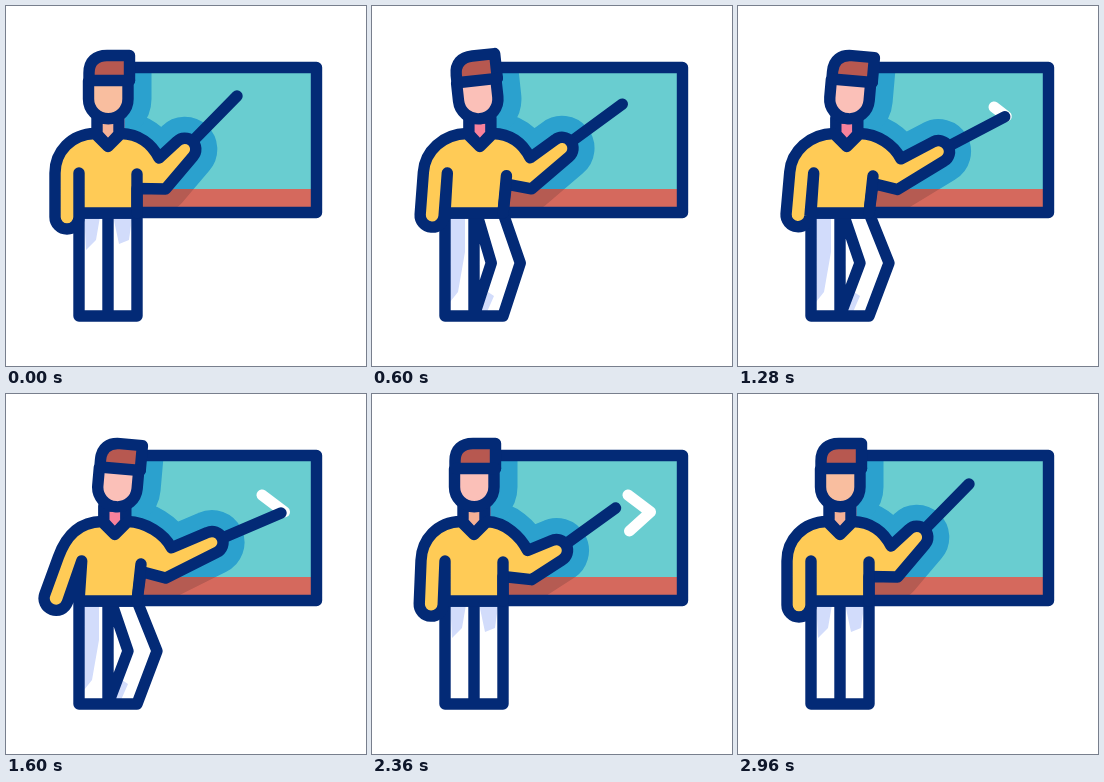
These frames come from a looping animation (360 by 360 pixels, 3 s). An HTML page:

```html
<!DOCTYPE html>
<html lang="en">
<head>
<meta charset="utf-8">
<title>Teacher at the board</title>
<style>
  html, body { margin: 0; width: 100%; height: 100%; overflow: hidden; background: #fff; }
  svg { display: block; width: 100vw; height: 100vh; }
  .ink { stroke: #032a76; stroke-width: 11.4; }
  .halo { stroke-width: 43; }
</style>
</head>
<body>
<svg viewBox="0 0 360 360" fill="none" stroke-linejoin="round" stroke-linecap="round">
  <defs>
    <clipPath id="teal"><path d="M119 61H311V183H119Z"/></clipPath>
    <clipPath id="rail"><path d="M119 183H311V207H119Z"/></clipPath>
    <clipPath id="pants"><path id="pantsClip"/></clipPath>
    <path id="skull" d="M83 74V67C83 55 90 49.500 101 49.500H123.500V74L122 76V93A19.750 19.750 0 0 1 82.500 93V75Z"/>
    <g id="shape">
      <path id="torsoHalo"/>
      <path id="headHalo" d="M83 60H124V93A20 20 0 0 1 83 93Z"/>
    </g>
  </defs>

  <path d="M119 61H311V183H119Z" fill="#69cdd0"/>
  <path d="M119 183H311V207H119Z" fill="#d5695d"/>
  <g clip-path="url(#teal)"><use href="#shape" class="halo" fill="#2ba1ce" stroke="#2ba1ce"/></g>
  <g clip-path="url(#rail)"><use href="#shape" class="halo" fill="#b55b52" stroke="#b55b52"/></g>
  <path class="ink" d="M123 61.500H310.500V206.500H131"/>

  <path id="chalk" d="M256 101L278.500 118L257.500 137" stroke="#fff" stroke-width="11" pathLength="1"/>
  <path id="stick" class="ink"/>

  <path id="legFill" fill="#fff"/>
  <g clip-path="url(#pants)"><path id="tint" fill="#d2dcfb"/></g>
  <path id="legs" class="ink"/>

  <path id="neck" class="ink" d="M91 112V128L102 140L113 128V112Z"/>
  <path id="torso" class="ink" fill="#ffcb56"/>
  <path id="side" class="ink"/>

  <g id="head">
    <use id="face" href="#skull"/>
    <path d="M83 74V67C83 55 90 49.500 101 49.500H123.500V74Z" fill="#b75850"/>
    <use href="#skull" class="ink"/>
    <path class="ink" d="M83 74.500H123.500"/>
  </g>
</svg>
<script>
const LOOP = 3000, STEP = 40, HOLD = 200;
const PEACH = "#f9be9f", PINK = "#fbc0b8";

// Pointing arm: where the hand and the stick's tip are at each turn
const rest = { hand: [179, 143], tip: [231, 90] };
const begin = { hand: [194, 142], tip: [257, 101] };
const corner = { hand: [206, 148.5], tip: [275, 119] };
const end = { hand: [190, 170], tip: [256, 138] };

const shades = {
  waist: "M78 205H95L90 234L80 244ZM106 205H127L123 234L113 238Z",
  lean: "M78 205H93V246L86 286L78 296ZM108 306L116 286L122 290L115 306Z",
  full: "M70 205H160V312H70Z"
};

const $ = id => document.getElementById(id);
const set = (id, name, value) => $(id).setAttribute(name, value);
const pt = (x, y) => x.toFixed(2) + " " + y.toFixed(2);
const mix = (a, b, u) => a.map((v, i) => v + (b[i] - v) * u);

// Progress from 0 to 1 between two times
const linear = (t, a, b) => Math.min(1, Math.max(0, (t - a) / (b - a)));
const ease = (t, a, b) => {
  const u = linear(t, a, b);
  return u * u * (3 - 2 * u);
};

function armAt(t, part) {
  let p = mix(rest[part], begin[part], ease(t, 200, 800));
  p = mix(p, corner[part], ease(t, 920, 1600));
  p = mix(p, end[part], linear(t, 1600, 2040));
  return mix(p, rest[part], ease(t, 2040, 2680));
}

function torsoPath(lean, swing, [handX, handY]) {
  const c = 6.8 * lean, d = 2.7 * lean;
  // hanging arm
  const sx = 61 + d, sy = 167;
  const wristX = 61 - lean - 17 * swing, wristY = 211 - 2 * lean - 8 * swing;
  const len = Math.hypot(wristX - sx, wristY - sy);
  const ux = (wristX - sx) / len, uy = (wristY - sy) / len;
  const nx = uy * 12, ny = -ux * 12;
  // the elbow follows the pointing hand
  const elbowX = 153 + .46 * (handX - 179), elbowY = 152 + .33 * (handY - 143);
  const underX = 159.5, underY = 183 + .2 * (handY - 143);
  const a = Math.atan2(handY - (elbowY + underY) / 2, handX - (elbowX + underX) / 2);
  const hx = Math.sin(a) * 11, hy = -Math.cos(a) * 11;
  return "M" + pt(73 + d, 167) +
    "L" + pt(wristX + nx, wristY + ny) +
    "A12 12 0 0 1 " + pt(wristX - nx, wristY - ny) +
    "L" + pt(sx - nx, sy - ny) +
    "C" + pt(sx - nx - ux * 21, sy - ny - uy * 21) + " " + pt(65 + c, 128) + " " + pt(89 + c, 127.5) +
    "L" + pt(102 + c, 140.5) + "L" + pt(115 + c, 127.5) +
    "C" + pt(133 + c, 128) + " " + pt(elbowX - 7, elbowY - 14) + " " + pt(elbowX, elbowY) +
    "L" + pt(handX + hx, handY + hy) +
    "A11 11 0 0 1 " + pt(handX - hx, handY - hy) +
    "L" + pt(underX, underY) +
    "L" + pt(131 + 4 * lean, 182.5 - 5 * lean) + "L131 207L73 207Z";
}

function draw(ms) {
  const t = ms < HOLD ? 0 : Math.floor(ms / STEP) * STEP;
  const lean = ease(t, 200, 720) - ease(t, 1640, 2040);
  const swing = ease(t, 1300, 1840) - ease(t, 1880, 2480);
  const nod = Math.sin(Math.PI * linear(t, 240, 960)) ** 2;
  const hand = armAt(t, "hand"), tip = armAt(t, "tip");

  const body = torsoPath(lean, swing, hand);
  set("torso", "d", body);
  set("torsoHalo", "d", body);
  set("side", "d", "M" + pt(131 + 4 * lean, 168 + 2 * lean) + "L131 207");
  set("stick", "d", "M" + pt(...hand) + "L" + pt(...tip));

  const pose = `translate(${7.3 * lean} 0) rotate(${5 * lean - 10.5 * nod} 102 115)`;
  set("head", "transform", pose);
  set("headHalo", "transform", pose);
  set("neck", "transform", `translate(${6.8 * lean} 0)`);

  const knee = 20 * lean;
  const legs = "M73 207H102V310H73ZM" + pt(102 + knee * .15, 207) + "L" + pt(102 + knee, 257) +
    "L102 310H131L" + pt(131 + knee, 257) + "L131 207Z";
  for (const id of ["legFill", "legs", "pantsClip"]) set(id, "d", legs);

  const drawn = (ease(t, 920, 1600) + linear(t, 1600, 2040)) / 2;
  set("chalk", "stroke-dasharray", drawn.toFixed(4) + " 3");
  set("chalk", "opacity", drawn > .005 ? 1 - linear(t, 2560, 2880) : 0);

  set("face", "fill", t < 400 || t > 2660 ? PEACH : PINK);
  set("neck", "fill", lean > .5 ? "#f8829c" : "#f5b196");
  set("tint", "d", t > 1740 && t < 2120 ? shades.full : lean > .5 ? shades.lean : shades.waist);
}

const start = performance.now();
function tick() {
  draw((performance.now() - start) % LOOP);
  requestAnimationFrame(tick);
}
tick();
</script>
</body>
</html>
```
